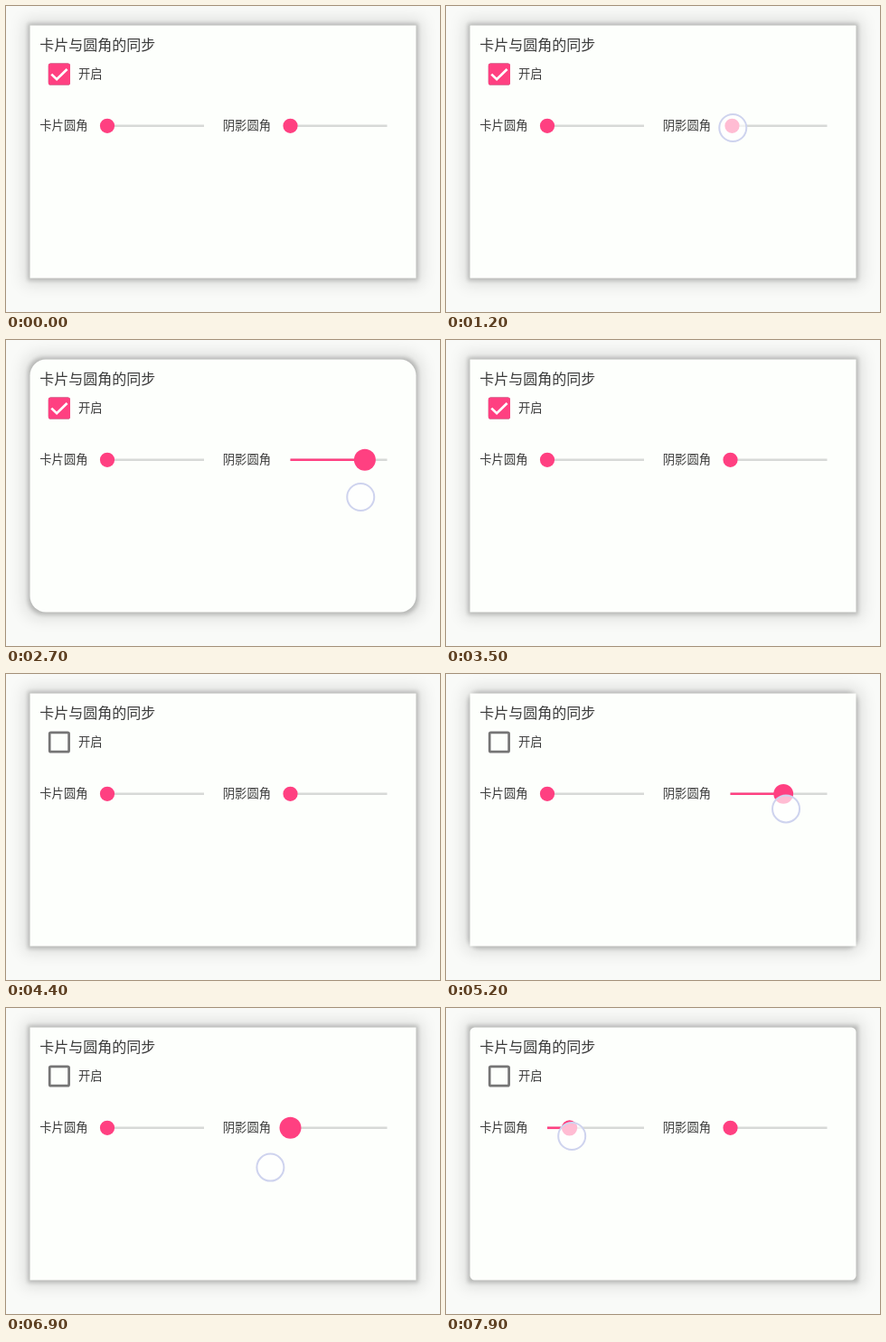
Recreate the animation shown at these times as an HTML page. Size 480 by 339 pixels, loop 8000 ms.

```html
<!DOCTYPE html>
<html lang="zh-CN">
<head>
<meta charset="utf-8">
<title>卡片与圆角的同步</title>
<style>
  html, body { margin: 0; width: 100%; height: 100%; overflow: hidden; background: #f9faf8; }
  svg { display: block; width: 480px; height: 339px; }
  text { font-family: "Noto Sans CJK SC", "Noto Sans CJK", sans-serif; font-size: 13.3px; fill: #3a3a3a; }
  .title { font-size: 16px; }
  .track { stroke: #d7d9d7; stroke-width: 2.6; }
  .active { stroke: #ff4081; stroke-width: 2.6; }
  .thumb { fill: #ff4081; }
</style>
</head>
<body>
<svg viewBox="0 0 480 339">
  <defs>
    <filter id="wide" filterUnits="userSpaceOnUse" x="-40" y="-40" width="560" height="420">
      <feGaussianBlur stdDeviation="8.5"/>
    </filter>
    <filter id="tight" filterUnits="userSpaceOnUse" x="-40" y="-40" width="560" height="420">
      <feGaussianBlur stdDeviation="2"/>
    </filter>
  </defs>
  <rect width="480" height="339" fill="#f9faf8"/>
  <rect class="shade" x="19.5" y="14.5" width="441" height="294.5" opacity=".11" filter="url(#wide)"/>
  <rect class="shade" x="24" y="19" width="432" height="285.5" opacity=".19" filter="url(#tight)"/>
  <rect id="card" x="26.5" y="21.5" width="427" height="280" fill="#fdfffc"/>

  <text class="title" x="37.3" y="49">卡片与圆角的同步</text>
  <text x="80" y="80">开启</text>
  <text x="37.3" y="137.1">卡片圆角</text>
  <text x="239.8" y="137.1">阴影圆角</text>

  <rect x="48.2" y="64.8" width="21.4" height="21.4" rx="1.5" fill="none" stroke="#757575" stroke-width="2.7"/>
  <g id="checked">
    <rect x="46.8" y="63.4" width="24.2" height="24.2" rx="2.6" fill="#ff4081"/>
    <path d="M50.3 75.6 L56.1 81.2 L67.6 70" fill="none" stroke="#fff" stroke-width="2.7"/>
  </g>

  <g id="sliders"></g>
  <circle id="touch" r="15" fill="#fff" fill-opacity=".65" stroke="#ced3ee" stroke-width="2"/>
</svg>
<script>
const LOOP = 8000, STEP = 100, SPAN = 107, MAX_RADIUS = 23, TRACK_Y = 132.8;
const $ = id => document.getElementById(id);
const clamp = (v, lo = 0, hi = 1) => Math.min(hi, Math.max(lo, v));
const smooth = u => (1 - Math.cos(Math.PI * u)) / 2;
const sineOut = u => Math.sin(Math.PI * u / 2);

// A finger lands at `down`, eases to `far` at `turn`, then returns to `end` at `back`,
// sinking at a steady rate, and lifts at `up`.
const tap = { down: 3900, turn: 4100, back: 4100, up: 4100,
              from: 62, far: 62, end: 62, y: 77, sink: 0, ease: smooth };
const shadowDrags = [
  { down: 1100, turn: 2300, back: 3220, up: 3400,
    from: 315, far: 448, end: 308, y: 132.4, sink: .026, ease: smooth },
  { down: 4800, turn: 6150, back: 7050, up: 7200,
    from: 315, far: 451, end: 281, y: 143, sink: .016, ease: sineOut }
];
const cardDrags = [
  { down: 7700, turn: 8700, back: 9700, up: 9700,
    from: 112, far: 200, end: 112, y: 138.8, sink: .016, ease: sineOut }
];
const gestures = [tap, ...shadowDrags, ...cardDrags];

function fingerX(g, t) {
  if (t < g.turn) return g.from + (g.far - g.from) * g.ease(clamp((t - g.down) / (g.turn - g.down)));
  return g.far + (g.end - g.far) * smooth(clamp((t - g.turn) / (g.back - g.turn || 1)));
}
const fingerY = (g, t) => g.y + g.sink * (Math.min(t, g.back) - g.down);

function makeSlider(x0, drags) {
  const add = (tag, attrs) => {
    const el = document.createElementNS("http://www.w3.org/2000/svg", tag);
    for (const k in attrs) el.setAttribute(k, attrs[k]);
    return $("sliders").appendChild(el);
  };
  const line = cls => add("line", { class: cls, x1: x0, x2: x0 + SPAN, y1: TRACK_Y, y2: TRACK_Y });
  line("track");
  const active = line("active");
  const thumb = add("circle", { class: "thumb", cy: TRACK_Y });
  return t => {
    let value = 0, grow = 0;
    const g = drags.find(d => t > d.down && t <= d.up + 100);
    if (g) {
      value = clamp((fingerX(g, t - 20) - x0) / SPAN);
      grow = clamp((t - g.down - 150) / 350) * clamp((g.up + 100 - t) / 200);
    }
    const x = x0 + value * SPAN;
    active.setAttribute("x2", x);
    thumb.setAttribute("cx", x);
    thumb.setAttribute("r", 8.1 + 3.9 * grow);
    return value;
  };
}

const cardSlider = makeSlider(112, cardDrags);
const shadowSlider = makeSlider(314.5, shadowDrags);
const shades = document.querySelectorAll(".shade");

function draw(t) {
  const own = cardSlider(t) * MAX_RADIUS;
  const shadow = shadowSlider(t) * MAX_RADIUS;
  const synced = t < tap.up;
  $("card").setAttribute("rx", synced ? Math.max(own, shadow) : own);
  shades.forEach(s => s.setAttribute("rx", shadow));
  $("checked").setAttribute("opacity", clamp(1 - (t - tap.up + 100) / 300));

  const hit = gestures.find(g => t >= g.down && t < g.up);
  $("touch").setAttribute("visibility", hit ? "visible" : "hidden");
  if (hit) {
    $("touch").setAttribute("cx", fingerX(hit, t));
    $("touch").setAttribute("cy", fingerY(hit, t));
  }
}

const start = performance.now();
let shown = -1;
function tick() {
  const t = Math.floor((performance.now() - start) % LOOP / STEP) * STEP;
  if (t !== shown) draw(shown = t);
  requestAnimationFrame(tick);
}
tick();
</script>
</body>
</html>
```
